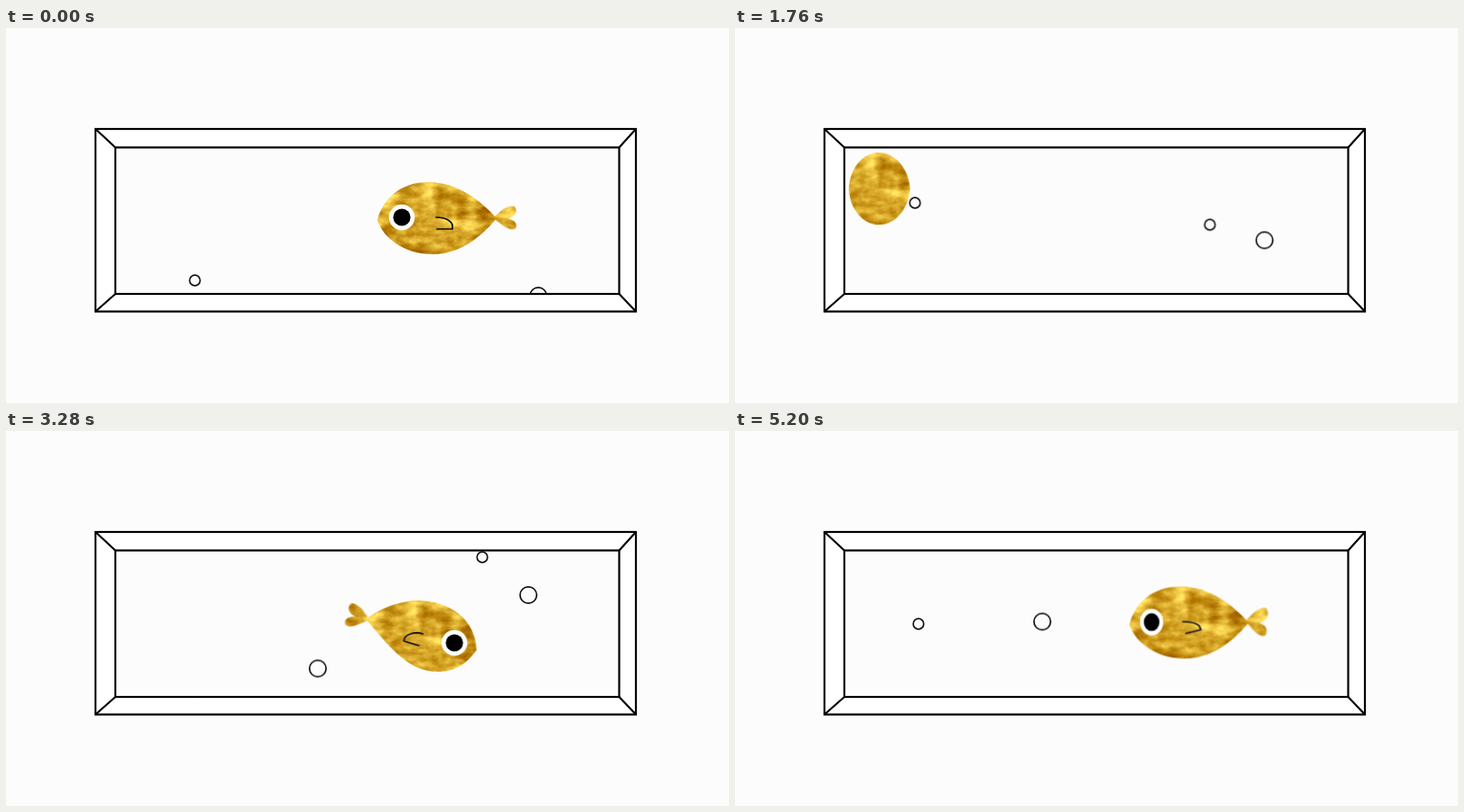
Write an HTML page without scripts that moves like this. It is 800 px wide and 416 px high and loops after 5240 ms.

```html
<!DOCTYPE html>
<html lang="en">
<head>
<meta charset="utf-8">
<title>Goldfish in a tank</title>
<style>
  html, body { margin: 0; width: 100%; height: 100%; overflow: hidden; background: #fcfcfc; }
  svg { display: block; width: 800px; height: 416px; }

  .tank { fill: #fff; stroke: #000; stroke-width: 2.2; stroke-linejoin: miter; }
  .water { fill: #fcfcfc; }
  .bubbles { fill: none; stroke: #111; stroke-width: 1.7; }
  .fin { fill: none; stroke: #0c1018; stroke-width: 1.7; stroke-linejoin: round; stroke-linecap: round; }

  .fish, .body, .tail, .eye, .fin, .bubbles circle { animation: 5240ms linear infinite; }
  .fish { animation-name: swim; }
  .body { animation-name: turn-body; }
  .tail { animation-name: turn-tail; }
  .eye { animation-name: turn-eye; }
  .fin { animation-name: turn-fin; }
  .bubbles .left { animation-name: rise-left; }
  .bubbles .middle { animation-name: rise-middle; }
  .bubbles .small { animation-name: rise-small; }
  .bubbles .right { animation-name: rise-right; }

  @keyframes swim {
    0%, 2.28% { transform: translate(477px, 211px); }
    2.29% { transform: translate(455px, 209px); }
    11.45% { transform: translate(366.5px, 201px); }
    24.43% { transform: translate(230.5px, 186px); }
    29.01% { transform: translate(184px, 180px); }
    34.35% { transform: translate(156px, 178px); }
    38.93% { transform: translate(187px, 180px); }
    43.51% { transform: translate(237px, 187px); }
    62.6% { transform: translate(459.5px, 228px); }
    70.61% { transform: translate(549px, 236px); }
    78.63% { transform: translate(623px, 238px); }
    83.21% { transform: translate(642px, 235px); }
    85.5% { transform: translate(642px, 234px); }
    89.31% { transform: translate(604px, 231px); }
    99.24%, 100% { transform: translate(502.5px, 212.5px); }
  }

  /* Left tip, top, right tip, bottom: the same four arcs in every pose. */
  @keyframes turn-body {
    0%, 25.2%, 90.5%, 100% { d: path("M-66 2C-60 -22 -40 -40 -10 -40C24 -40 48 -19 66 0C48 22 24 40 -5 40C-36 40 -60 22 -66 2Z"); }
    34.35%, 85.5% { d: path("M-31 0C-31 -22 -17 -40 0 -40C17 -40 31 -22 31 0C31 22 17 40 0 40C-17 40 -31 22 -31 0Z"); }
    43.51% { d: path("M-57 -9C-40 -27 -18 -39 4 -39C36 -39 56 -16 58 10C46 29 28 39 6 39C-24 39 -40 16 -57 -9Z"); }
    62.6%, 70.61% { d: path("M-61.5 -19.5C-45 -32 -22 -40 -4 -40C30 -40 60 -20 61 15C50 30 38 39 18 39C-16 39 -38 8 -61.5 -19.5Z"); }
    83.21% { d: path("M-32 -3C-22 -27 -10 -39 4 -40C22 -40 32 -20 31.5 0C28 24 16 40 -1 40C-20 40 -30 20 -32 -3Z"); }
  }

  @keyframes turn-tail {
    0% { transform: translate(66px, 0) rotate(2deg) scale(1, 1); }
    11.45% { transform: translate(66px, 1px) rotate(-5deg) scale(1, 1); }
    25.2% { transform: translate(66px, -1px) rotate(0deg) scale(1, 1); }
    34.35% { transform: translate(0, 0) rotate(0deg) scale(0, 1); }
    43.51% { transform: translate(-57px, -9px) rotate(33deg) scale(-1.1, 1.1); }
    62.6%, 70.61% { transform: translate(-61.5px, -19.5px) rotate(12deg) scale(-1, 1); }
    83.21% { transform: translate(-32px, -3px) rotate(14deg) scale(-1, 1); }
    85.5% { transform: translate(0, 0) rotate(0deg) scale(0, 1); }
    90.5% { transform: translate(66px, 0) rotate(-4deg) scale(1, 1); }
    99.24%, 100% { transform: translate(66px, -1px) rotate(6deg) scale(.95, 1.2); }
  }

  @keyframes turn-eye {
    0%, 15% { transform: translate(-39px, -1px) scale(1, 1); }
    24.43% { transform: translate(-44.5px, -1px) scale(.84, 1.05); }
    30%, 31% { transform: translate(-46px, 0) scale(0, 1); }
    31.01%, 39% { transform: translate(46px, 2px) scale(0, 1); }
    43.51% { transform: translate(43px, 4.5px) scale(.74, 1.04); }
    52% { transform: translate(39px, 6px) scale(.95, 1); }
    62.6%, 70.61% { transform: translate(36.5px, 7px) scale(1, 1); }
    78.63% { transform: translate(38px, 5px) scale(.4, 1); }
    80.8%, 84% { transform: translate(38px, 5px) scale(0, 1); }
    84.01%, 86% { transform: translate(-36px, 0) scale(0, 1); }
    91% { transform: translate(-48px, 0) scale(.65, 1); }
    99.24%, 100% { transform: translate(-41.5px, -.5px) scale(.9, 1.03); }
  }

  @keyframes turn-fin {
    0%, 14% { opacity: 1; d: path("M-1 -1C9 -1 17 3 17 9L17 12L0 12"); }
    24.43% { d: path("M-22 -7C-14 -6 -6 3 -7 10L-6 13L-21 7"); }
    31% { opacity: 1; }
    33%, 36.5% { opacity: 0; d: path("M-25 1C-32 -4 -37 -1 -36 3L-35 6L-22 12"); }
    36.51%, 38% { opacity: 0; d: path("M25 1C32 -4 37 -1 36 3L35 6L22 12"); }
    39.5% { opacity: 1; }
    43.51% { d: path("M11 -4C3 -7 -6 -4 -7 1L-8 3L7 8"); }
    62.6%, 70.61% { d: path("M1.5 -3C-8 -6 -18 -2 -19 3L-19.5 5L-3 10"); }
    83.21% { opacity: 1; d: path("M25 0C32 -4 37 -1 36 3L35 6L22 12"); }
    84.5% { opacity: 0; d: path("M25 0C32 -4 37 -1 36 3L35 6L22 12"); }
    84.51%, 85.5% { opacity: 0; d: path("M-29 0C-35 -3 -37 0 -36 3L-35 7L-24 12"); }
    87% { opacity: 1; }
    92% { d: path("M-24 -2C-14 -2 -8 2 -7 5L-6 8L-21 12"); }
    99.24%, 100% { opacity: 1; d: path("M-7 -1C4 -1 12 2 12 6L13 8L-3.5 12"); }
  }

  @keyframes rise-left {
    0% { transform: translate(209px, 280px); }
    11.45% { transform: translate(207.5px, 251px); }
    24.43% { transform: translate(203px, 218px); }
    43.51% { transform: translate(195px, 168px); }
    60% { transform: translate(187px, 126px); }
    60.01%, 66% { transform: translate(209px, 301px); }
    83.21% { transform: translate(208px, 255px); }
    99.24%, 100% { transform: translate(203px, 214px); }
  }
  @keyframes rise-middle {
    0%, 34% { transform: translate(346px, 305px); }
    43.51% { transform: translate(346px, 291px); }
    62.6% { transform: translate(345px, 263.5px); }
    83.21% { transform: translate(342.5px, 234px); }
    99.24%, 100% { transform: translate(340px, 211.5px); }
  }
  @keyframes rise-small {
    0%, 3% { transform: translate(528px, 301px); }
    11.45% { transform: translate(527.5px, 277.5px); }
    24.43% { transform: translate(525px, 243px); }
    43.51% { transform: translate(526px, 191.5px); }
    62.6% { transform: translate(527px, 140px); }
    68% { transform: translate(527px, 125px); }
    68.01%, 69% { transform: translate(528px, 301px); }
    83.21% { transform: translate(526px, 262.5px); }
    99.24%, 100% { transform: translate(525px, 219px); }
  }
  @keyframes rise-right {
    0% { transform: translate(589px, 297px); }
    11.45% { transform: translate(589px, 276px); }
    24.43% { transform: translate(587.5px, 252.5px); }
    43.51% { transform: translate(584px, 217px); }
    62.6% { transform: translate(578px, 182px); }
    83.21% { transform: translate(570.5px, 144px); }
    95%, 100% { transform: translate(566px, 121px); }
  }
</style>
</head>
<body>
<svg viewBox="0 0 800 416" xmlns="http://www.w3.org/2000/svg">
  <defs>
    <clipPath id="inside"><rect x="121" y="133" width="557" height="162"/></clipPath>
    <filter id="foil" filterUnits="userSpaceOnUse" x="-100" y="-60" width="200" height="120" color-interpolation-filters="sRGB">
      <feTurbulence type="fractalNoise" baseFrequency=".045 .07" numOctaves="5" seed="8"/>
      <feColorMatrix values=".7 0 0 0 .48  .9 0 0 0 .19  .8 0 0 0 -.25  0 0 0 0 1"/>
      <feComposite in2="SourceAlpha" operator="in"/>
    </filter>
  </defs>

  <g class="tank">
    <rect x="99" y="112" width="598" height="202.5"/>
    <path d="M99 112L121 132.5M697 112L678.5 132.5M99 314.5L121 295M697 314.5L678.5 295"/>
    <rect class="water" x="121" y="132.5" width="557.5" height="162.5"/>
  </g>

  <g class="bubbles" clip-path="url(#inside)">
    <circle class="left" r="5.8"/>
    <circle class="middle" r="9.2"/>
    <circle class="small" r="5.8"/>
    <circle class="right" r="9.2"/>
  </g>

  <g class="fish">
    <g filter="url(#foil)">
      <path class="tail" d="M-4 0C4 -8 10 -15 19 -14C24 -8 20 -2 12 0C20 1 24 6 21 11C14 14 7 8 -4 0Z"/>
      <path class="body" d="M-66 2C-60 -22 -40 -40 -10 -40C24 -40 48 -19 66 0C48 22 24 40 -5 40C-36 40 -60 22 -66 2Z"/>
    </g>
    <g class="eye">
      <circle r="14.3" fill="#fff"/>
      <circle r="9.6"/>
    </g>
    <path class="fin" d="M-1 -1C9 -1 17 3 17 9L17 12L0 12"/>
  </g>
</svg>
</body>
</html>
```
